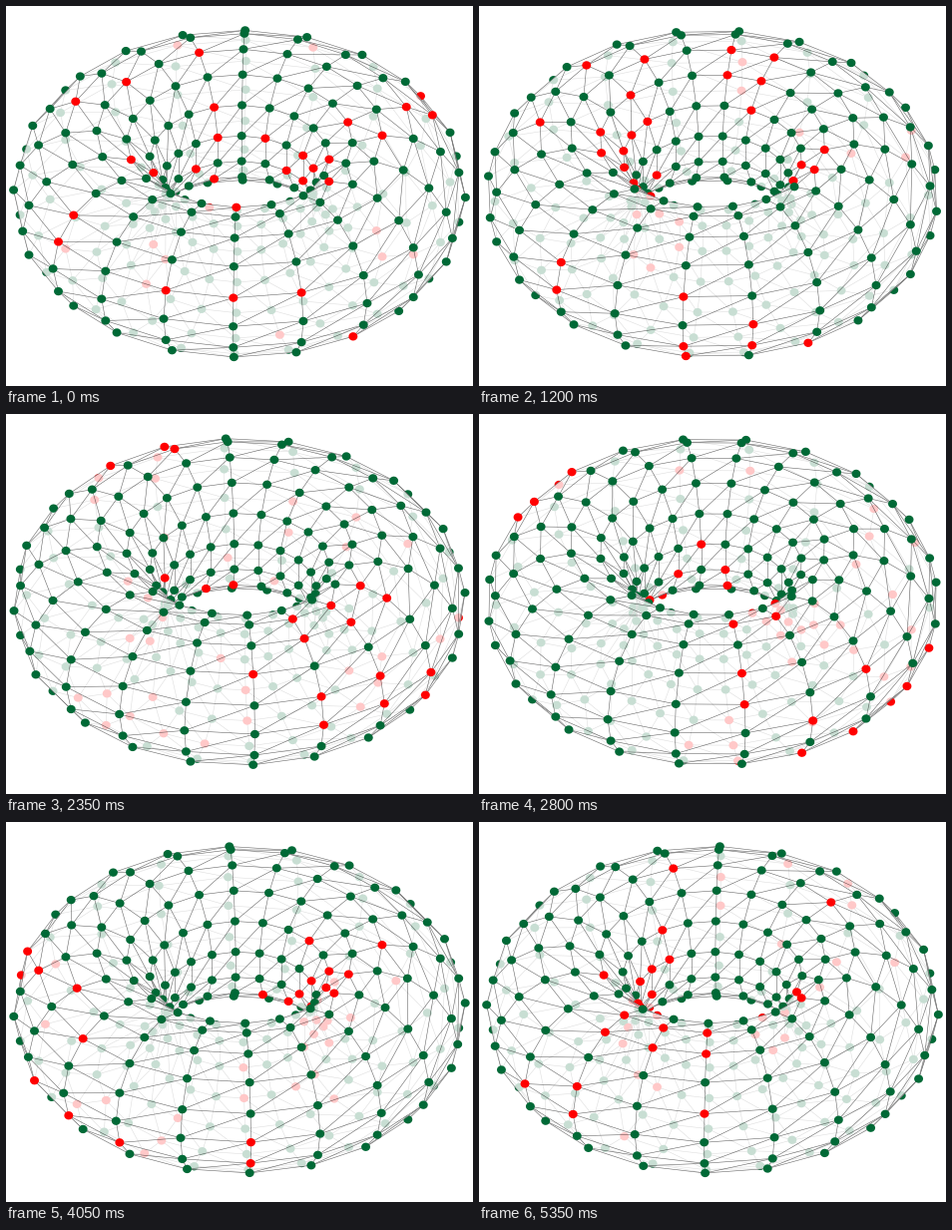
Recreate the animation shown at these times as a matplotlib script. Size 468 by 381 pixels, loop 5.4 s.

```python
import numpy as np
import matplotlib.pyplot as plt
from matplotlib.animation import FuncAnimation
from matplotlib.collections import PolyCollection

W, H, DPI = 468, 381, 100
FRAMES, INTERVAL = 108, 50
COLS, ROWS = 20, 15
RING, TUBE = 151.0, 75.5
CX, CY = 234.0, 188.2
TILT = np.radians(36)
START, STEP = -1.6, 0.5          # degrees
LIVE_MIN = 44
EDGE_LIFT = 12                   # keeps edges just past the rim visible

GREEN = (0, 0.41, 0.21, 1)
RED = (1, 0, 0, 1)
VEIL = (1, 1, 1, 0.79)
EDGE = (0.42, 0.42, 0.42, 1)
CLEAR = (0, 0, 0, 0)

# live columns in each tube row at the start
SEED = {
    1: (-9, -3, -1, 0, 1, 7, 9), 2: (-3, 6), 3: (-6, 6), 4: (-9, -7, 5),
    5: (-4, 0, 3, 6), 6: (-9, -4, -1, 5), 7: (-9, 6, 7, 9), 8: (-8, 7, 8),
    9: (-9, -4, -3), 10: (-3,), 11: (1, 5, 6), 12: (-5, 5), 13: (2,),
}


def first_cells():
    cells = np.zeros((COLS, ROWS), bool)
    for row, cols in SEED.items():
        cells[list(cols), row] = True
    return cells


def next_cells(cells, rng):
    """Game of Life on the torus, topped up with scattered sparks."""
    count = sum(np.roll(cells.astype(int), (a, b), (0, 1))
                for a in (-1, 0, 1) for b in (-1, 0, 1) if a or b)
    new = (count == 3) | (cells & (count == 2))
    missing = max(0, LIVE_MIN - new.sum())
    new.flat[rng.choice(new.size, missing, replace=False)] = True
    return new


def history():
    rng = np.random.default_rng(4)
    states = [first_cells()]
    while len(states) < FRAMES:
        states.append(next_cells(states[-1], rng))
    return [s.ravel() for s in states]


def mesh():
    """Triangles, edges, and the three edges of each triangle."""
    def node(a, b):
        return (a % COLS) * ROWS + b % ROWS

    a, b = node(J, K), node(J + 1, K)
    c, d = node(J + 1, K + 1), node(J, K + 1)
    n = len(a)
    tris = np.vstack([np.column_stack([a, b, c]), np.column_stack([a, c, d])])
    edges = np.vstack([np.column_stack([a, e]) for e in (b, d, c)])
    sides = np.vstack([np.column_stack([a, b + n, a + 2 * n]),
                       np.column_stack([d, a + n, a + 2 * n])])
    return tris, edges, sides


J, K = (g.ravel() for g in np.mgrid[0:COLS, 0:ROWS])
PHI = 2 * np.pi * K / ROWS
RHO = RING + TUBE * np.cos(PHI)
LIFT = TUBE * np.sin(PHI)
TRIS, EDGES, SIDES = mesh()
CELLS = history()
turn = np.linspace(0, 2 * np.pi, 16, endpoint=False)
DISC = np.column_stack([4.5 * np.cos(turn), 4.2 * np.sin(turn)])


def project(angle):
    theta = np.radians(angle + 360 / COLS * J)
    x, z = RHO * np.sin(theta), RHO * np.cos(theta)
    pts = np.column_stack([CX + x,
                           CY + z * np.sin(TILT) - LIFT * np.cos(TILT)])
    return pts, z * np.cos(TILT) + LIFT * np.sin(TILT)


def facing(pts):
    p, q, r = (pts[TRIS[:, i]] for i in range(3))
    u, v = q - p, r - p
    return u[:, 0] * v[:, 1] - u[:, 1] * v[:, 0] < 0


def raise_above(depth, members, face_depth, gap):
    """Put each part on top of the visible faces it belongs to."""
    out = depth.copy()
    for col in members.T:
        np.maximum.at(out, col, face_depth + gap)
    return out


fig = plt.figure(figsize=(W / DPI, H / DPI), dpi=DPI, facecolor="white")
ax = fig.add_axes([0, 0, 1, 1])
ax.set_xlim(0, W)
ax.set_ylim(H, 0)
ax.axis("off")
shapes = PolyCollection([])
ax.add_collection(shapes, autolim=False)


def draw(n):
    pts, depth = project(START + STEP * n)
    front = facing(pts)
    tris = TRIS[front]
    tri_depth = depth[tris].mean(axis=1)
    edge_depth = raise_above(depth[EDGES].mean(axis=1) + EDGE_LIFT,
                             SIDES[front], tri_depth, 0.1)
    dot_depth = raise_above(depth, tris, tri_depth, 0.2)
    dot_depth = raise_above(dot_depth, EDGES, edge_depth, 0.1)

    polys = list(pts[tris]) + list(pts[EDGES]) + [p + DISC for p in pts]
    nt, ne, nd = len(tris), len(EDGES), len(pts)
    dots = [RED if on else GREEN for on in CELLS[n]]
    faces = np.array([VEIL] * nt + [CLEAR] * ne + dots)
    lines = np.array([CLEAR] * nt + [EDGE] * ne + [CLEAR] * nd)
    widths = np.array([0.0] * nt + [0.42] * ne + [0.0] * nd)

    order = np.argsort(np.concatenate([tri_depth, edge_depth, dot_depth]),
                       kind="stable")
    shapes.set_verts([polys[i] for i in order])
    shapes.set_facecolor(faces[order])
    shapes.set_edgecolor(lines[order])
    shapes.set_linewidth(widths[order])
    return (shapes,)


anim = FuncAnimation(fig, draw, frames=FRAMES, interval=INTERVAL,
                     repeat=True, repeat_delay=0)
plt.show()
```
